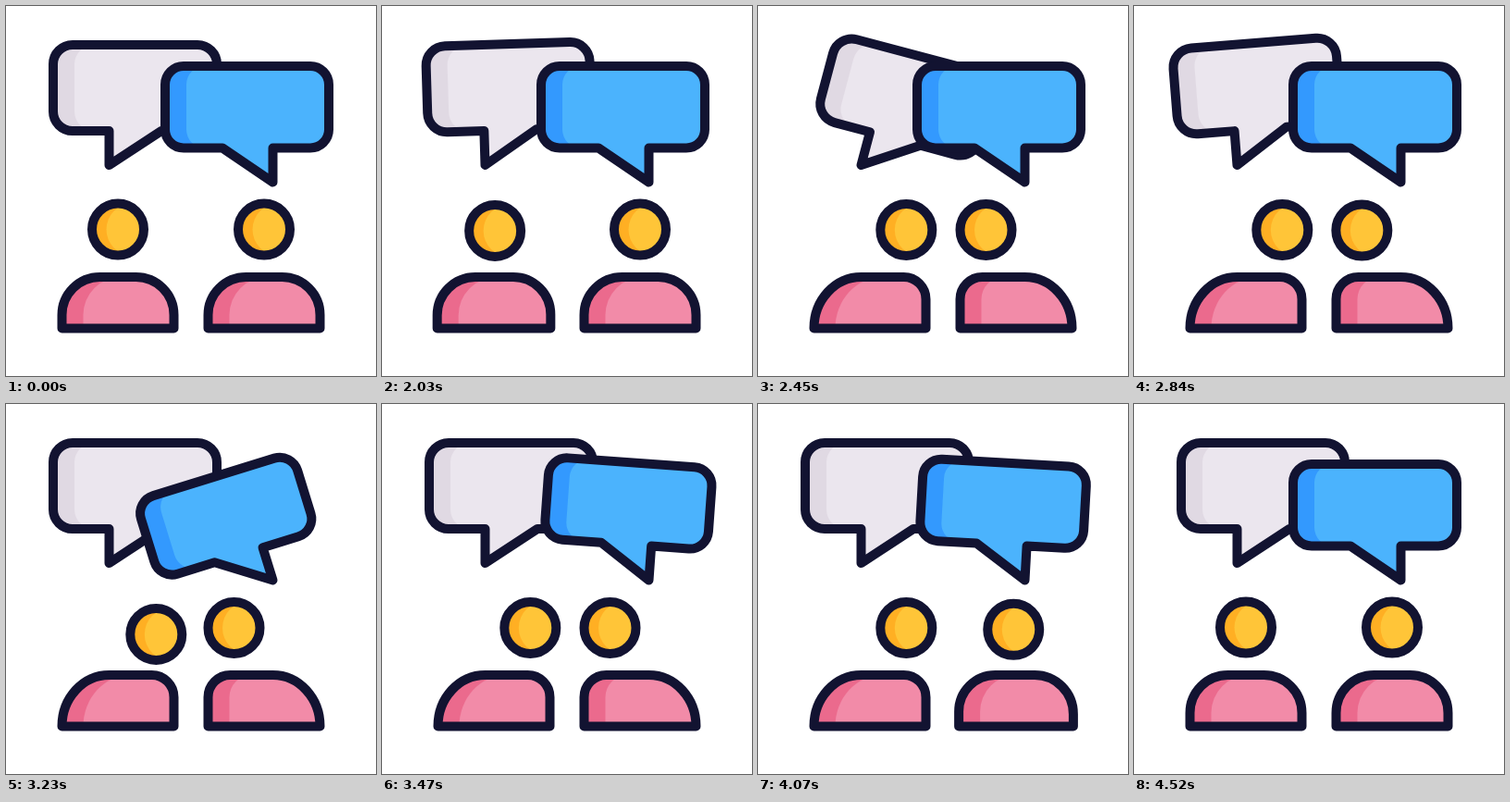
These frames come from a looping animation (400 px wide and 400 px high, 4.55 s). An HTML page:

```html
<!DOCTYPE html>
<html lang="en">
<head>
<meta charset="utf-8">
<title>Two people talking</title>
<style>
  html, body { margin: 0; width: 100%; height: 100%; overflow: hidden; background: #fff; }
  svg { display: block; width: 100vw; height: 100vh; }
  .line { fill: none; stroke: #121331; stroke-width: 10; stroke-linejoin: round; stroke-linecap: round; }
</style>
</head>
<body>
<svg viewBox="0 0 400 400">
  <defs>
    <clipPath id="clipL"><path id="shapeL" d="M72 42H207A21 21 0 0 1 228 63V114A21 21 0 0 1 207 135H168L111.5 172V135H72A21 21 0 0 1 51 114V63A21 21 0 0 1 72 42Z"/></clipPath>
    <clipPath id="clipR"><path id="shapeR" d="M192 65H329A20 20 0 0 1 349 85V133.5A20 20 0 0 1 329 153.5H288.5V190.5L234 153.5H192A20 20 0 0 1 172 133.5V85A20 20 0 0 1 192 65Z"/></clipPath>
    <clipPath id="clipHead"><circle r="28"/></clipPath>
    <clipPath id="clipA"><path class="a"/></clipPath>
    <clipPath id="clipB"><path class="b"/></clipPath>
    <g id="head">
      <g clip-path="url(#clipHead)">
        <circle r="28" fill="#ffaf23"/>
        <circle cx="16" r="28.5" fill="#ffc538"/>
      </g>
      <circle r="28" class="line"/>
    </g>
  </defs>

  <g id="bubbleL">
    <g clip-path="url(#clipL)">
      <rect x="40" y="30" width="200" height="160" fill="#e0d9e3"/>
      <path d="M95 42A21 21 0 0 0 74 63V114A21 21 0 0 0 95 135V200H250V42Z" fill="#ebe6ee"/>
    </g>
    <use href="#shapeL" class="line"/>
  </g>

  <g id="bubbleR">
    <g clip-path="url(#clipR)">
      <rect x="160" y="50" width="200" height="160" fill="#3399fe"/>
      <path d="M215 65A20 20 0 0 0 195 85V133.5A20 20 0 0 0 215 153.5V210H370V65Z" fill="#4bb3fd"/>
    </g>
    <use href="#shapeR" class="line"/>
  </g>

  <g clip-path="url(#clipA)">
    <path class="a" fill="#eb6a8d"/>
    <path class="a" fill="#f28ba8" transform="translate(23 0)"/>
  </g>
  <path class="a line"/>
  <g clip-path="url(#clipB)">
    <path class="b" fill="#eb6a8d"/>
    <path class="b" fill="#f28ba8" transform="translate(23 0)"/>
  </g>
  <path class="b line"/>

  <use href="#head" id="headA"/>
  <use href="#head" id="headB"/>
</svg>
<script>
const LOOP = 4550, START = 2030, STEP = 30;
const el = id => document.getElementById(id);
const mix = (a, b, p) => a + (b - a) * p;
const ease = p => (1 - Math.cos(Math.PI * p)) / 2;
const phase = (t, from, to) => Math.min(1, Math.max(0, (t - from) / (to - from)));
const bump = p => Math.sin(Math.PI * p);

// [time, angle] keys, eased between neighbours
const swingL = [[1985, 0], [2225, -21], [2470, 15.5], [2730, -9], [3000, 3.5], [3195, 0]];
const swingR = [[3050, 0], [3300, -21], [3570, 15], [3835, -9], [4095, 3.5], [4290, 0]];

function track(keys, t) {
  if (t <= keys[0][0]) return keys[0][1];
  for (let i = 1; i < keys.length; i++) {
    const [t0, v0] = keys[i - 1], [t1, v1] = keys[i];
    if (t < t1) return mix(v0, v1, ease((t - t0) / (t1 - t0)));
  }
  return keys[keys.length - 1][1];
}

// outer side flattens and inner corner tightens as the person leans
function body(x, lean, swell, mirror) {
  const far = [mix(41, 51, lean), mix(41, 55.5, lean)];
  const near = [mix(41, 24, lean), mix(41, 24, lean)];
  const [l, r] = mirror ? [near, far] : [far, near];
  const x0 = x - swell, x1 = x + 121 + swell, top = 293, base = 348.5;
  return `M${x0} ${base}V${top + l[1]}A${l} 0 0 1 ${x0 + l[0]} ${top}` +
    `H${x1 - r[0]}A${r} 0 0 1 ${x1} ${top + r[1]}V${base}Z`;
}

function person(t, o) {
  const go = phase(t, ...o.go), back = phase(t, ...o.back);
  const lean = ease(go) - ease(back);
  const arc = bump(go) + bump(back);
  const nod = bump(phase(t, ...o.nod)) ** 2;
  const x = o.head + o.reach * lean + o.dir * 2 * nod;
  const y = 241.6 + 0.4 * lean + 4 * arc + 7 * nod;
  el(o.id).setAttribute('transform', `translate(${x} ${y})`);
  const d = body(o.x, lean, 2.5 * arc, o.dir < 0);
  document.querySelectorAll('.' + o.cls).forEach(p => p.setAttribute('d', d));
}

const people = [
  { id: 'headA', cls: 'a', x: 60.5, head: 121, reach: 39.3, dir: 1,
    go: [1985, 2400], back: [4080, 4520], nod: [3070, 3400] },
  { id: 'headB', cls: 'b', x: 218.5, head: 279, reach: -32.5, dir: -1,
    go: [2030, 2450], back: [3660, 4165], nod: [2540, 2870] }
];

function draw(t) {
  t = t < START ? 0 : START + Math.floor((t - START) / STEP) * STEP;
  el('bubbleL').setAttribute('transform', `rotate(${track(swingL, t)} 111.5 172)`);
  el('bubbleR').setAttribute('transform', `rotate(${track(swingR, t)} 288.5 190.5)`);
  people.forEach(o => person(t, o));
}

let begin = null;
function tick(now) {
  if (begin === null) begin = now;
  draw((now - begin) % LOOP);
  requestAnimationFrame(tick);
}
draw(0);
requestAnimationFrame(tick);
</script>
</body>
</html>
```
